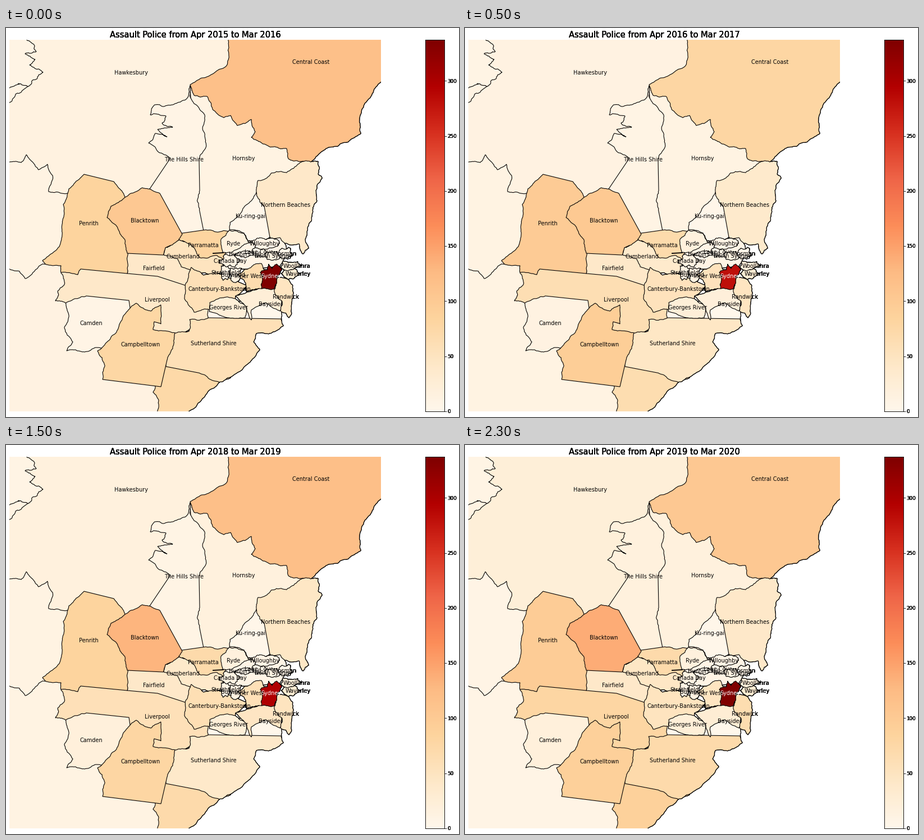
Animation, 807 px wide and 694 px high, one loop 2500 ms. Source, as a matplotlib script:

```python
import numpy as np
import matplotlib.pyplot as plt
from matplotlib.animation import FuncAnimation
from matplotlib.patches import Polygon

W, H = 807, 694
LEFT, TOP, RIGHT, BOTTOM = 6, 21, 668, 684
VMAX = 337.4
YEARS = 5
PX = 0.72  # points per pixel at 100 dpi
CMAP = plt.get_cmap("OrRd")

plt.rcParams["font.family"] = "DejaVu Sans"
fig = plt.figure(figsize=(W / 100, H / 100), dpi=100, facecolor="white")
rng = np.random.default_rng(7)
areas = []


def pixel_axes(x0, y0, x1, y1):
    return fig.add_axes([x0 / W, 1 - y1 / H, (x1 - x0) / W, (y1 - y0) / H])


ax = pixel_axes(LEFT, TOP, RIGHT, BOTTOM)
ax.set_xlim(LEFT, RIGHT)
ax.set_ylim(BOTTOM, TOP)
ax.axis("off")


def roughen(coords, wobble):
    """Break edges into a ragged line by midpoint shifts; long edges stay straight."""
    pts = np.array(coords, float).reshape(-1, 2)
    ragged = np.hypot(*(np.roll(pts, -1, axis=0) - pts).T) < 45
    for _ in range(4):
        step = np.roll(pts, -1, axis=0) - pts
        shift = rng.uniform(-wobble, wobble, len(pts)) * ragged
        normal = np.column_stack([-step[:, 1], step[:, 0]])
        mid = pts + step / 2 + shift[:, None] * normal
        pts = np.stack([pts, mid], axis=1).reshape(-1, 2)
        ragged = np.repeat(ragged, 2)
    return pts


def label(name, x, y, color="black"):
    # Copies below the map darken the letters that reach past the coast.
    for z in (0, 0, 0, 0, 5):
        ax.text(x, y + 3.6, name, color=color, size=9.8 * PX, ha="center", zorder=z)


def area(level, coords, wobble=0.1):
    """Add an area with one level, or one per year; later areas cover earlier ones."""
    pts = roughen(coords, wobble)
    ax.add_patch(Polygon(pts, fc="black", ec="black", lw=1.5 * PX, zorder=1))
    patch = Polygon(pts, ec="black", lw=1.1 * PX, zorder=2)
    ax.add_patch(patch)
    areas.append((patch, np.broadcast_to(level, YEARS)))


def suburb(name, x, y, level, rx, ry, dx=0):
    """A small harbour suburb: a spiky oval near its label."""
    label(name, x, y)
    a = np.linspace(0, 2 * np.pi, 16, endpoint=False)
    r = rng.uniform(0.65, 1.2, len(a))
    area(level, np.column_stack([x + dx + rx * r * np.cos(a), y + ry * r * np.sin(a)]), 0.2)


# Western and northern background
label("Hawkesbury", 223, 79)
area([15, 14, 18, 18, 25], [0, 10, 410, 10, 410, 110, 340, 320, 100, 320, 0, 320])
area([14, 13, 8, 13, 8], [0, 400, 0, 700, 300, 700, 300, 420])
area([13, 12, 12, 12, 8], [
    0, 239, 27, 240, 36, 226, 49, 241, 58, 253, 74, 243, 83, 263, 76, 292, 109, 295,
    150, 300, 150, 400, 120, 425, 65, 421, 53, 431, 34, 447, 24, 434, 0, 430])
area(12, [0, 136, 17, 118, 40, 104, 20, 100, 0, 106], 0.15)
area(10, [
    0, 10, 33, 10, 37, 21, 50, 30, 54, 42, 34, 46, 52, 56, 42, 66, 66, 79, 55, 91,
    40, 104, 22, 99, 0, 106], 0.18)

label("Hornsby", 423, 232)
area([12, 12, 8, 18, 18], [
    328, 103, 420, 100, 520, 200, 543, 239, 500, 300, 470, 340, 420, 370, 340, 375])
label("Central Coast", 543, 60)
area([118, 80, 120, 120, 105], [
    397, 10, 397, 50, 393, 67, 358, 87, 328, 101, 335, 120, 358, 122, 368, 145,
    388, 160, 400, 156, 412, 174, 437, 163, 444, 185, 437, 195, 458, 207, 484, 213,
    500, 215, 503, 233, 521, 238, 543, 239, 570, 215, 610, 203, 632, 188, 630, 160,
    637, 140, 652, 118, 668, 96, 690, 90, 690, 10])
label("The Hills Shire", 317.5, 234)
area([8, 10, 14, 10, 18], [
    328, 103, 323, 125, 297, 137, 265, 137, 257, 155, 285, 157, 278, 170, 297, 177,
    270, 181, 287, 194, 266, 188, 254, 205, 270, 220, 293, 232, 254, 290, 270, 350,
    320, 375, 354, 372, 345, 327, 345, 290, 344, 235, 355, 198, 354, 155, 335, 135], 0.13)

# South-west and south
label("Liverpool", 269, 484)
area([42, 64, 66, 58, 80], [
    98, 436, 104, 458, 92, 470, 88, 487, 107, 491, 230, 520, 290, 560, 340, 530,
    370, 512, 340, 460, 250, 420, 120, 425], 0.15)
label("Camden", 151.5, 526)
area([8, 14, 12, 20, 20], [
    107, 490, 143, 478, 219, 486, 230, 560, 190, 590, 170, 571, 140, 578, 108, 576,
    119, 560, 104, 534, 112, 515, 108, 500])
area([75, 66, 72, 72, 90], [
    270, 600, 400, 590, 400, 624, 380, 632, 350, 661, 318, 690, 318, 700, 262, 700,
    272, 664, 262, 650, 270, 625])
area(2, [360, 495, 480, 480, 491, 509, 490, 525, 360, 525])
label("Sutherland Shire", 369.5, 562.5)
area([60, 46, 50, 40, 72], [
    285, 604, 280, 560, 301, 544, 326, 541, 327, 520, 362, 517, 490, 519, 494, 531,
    480, 541, 446, 545, 441, 560, 452, 574, 430, 600, 395, 624, 380, 632, 342, 615])
label("Campbelltown", 240, 564)
area([78, 95, 82, 80, 92], [
    219, 502, 232, 491, 258, 505, 276, 494, 276, 528, 264, 524, 262, 538, 301, 544,
    297, 572, 287, 592, 276, 640, 172, 627, 176, 602, 163, 576, 195, 545, 204, 525])

# West
label("Penrith", 147.5, 348)
area([85, 100, 85, 85, 98], [
    139, 261, 192, 274, 212, 302, 230, 320, 230, 390, 219, 403, 216, 438, 133, 430,
    128, 440, 98, 436, 98, 424, 70, 421, 65, 415, 95, 390, 100, 350, 102, 315, 112, 287], 0.08)
label("Fairfield", 263.5, 428)
area(42, [219, 395, 285, 395, 345, 420, 345, 450, 319, 459, 270, 443, 216, 438])
label("Cumberland", 315, 407.5)
area([52, 38, 33, 40, 45], [
    281, 405, 284, 392, 308, 378, 345, 390, 390, 405, 383, 436, 345, 437, 312, 426, 306, 412])
label("Parramatta", 351, 387)
area([83, 70, 72, 72, 72], [
    300, 368, 356, 360, 398, 362, 415, 370, 400, 405, 391, 417, 376, 406, 346, 410,
    335, 392, 309, 378])
label("Blacktown", 247, 343)
area([105, 103, 120, 132, 141], [
    212, 302, 243, 285, 274, 295, 314, 368, 307, 379, 284, 392, 280, 405, 216, 402,
    212, 378, 196, 352, 180, 338, 187, 318], 0.08)

# Inner south
label("Canterbury-Bankstown", 380.5, 465)
area([60, 55, 45, 62, 52], [
    319, 459, 330, 427, 352, 441, 384, 440, 430, 460, 409, 478, 408, 490, 364, 495,
    364, 503, 335, 507, 318, 483])
label("Georges River", 396, 498)
area(25, [363, 490, 380, 482, 409, 483, 428, 495, 426, 517, 395, 517, 362, 506])
label("Bayside", 469, 492)
area([26, 22, 22, 48, 28], [
    409, 478, 430, 471, 450, 465, 485, 460, 491, 488, 488, 505, 463, 490, 437, 503,
    437, 521, 428, 497])

# North shore
label("Ku-ring-gai", 436, 335)
area(5, [
    446, 293, 425, 318, 399, 347, 398, 360, 424, 366, 433, 383, 470, 373, 485, 360, 470, 310])
label("Northern Beaches", 498.5, 315)
area([42, 38, 44, 46, 42], [
    543, 239, 556, 238, 556, 261, 563, 268, 552, 290, 546, 325, 541, 347, 533, 378,
    539, 393, 529, 403, 522, 385, 500, 384, 470, 373, 460, 318, 446, 292, 449, 272,
    482, 256, 500, 258, 523, 241], 0.14)
label("Ryde", 405, 384)
area(18, [398, 361, 424, 366, 434, 385, 425, 400, 386, 400, 383, 377])

# Harbour
area(8, [430, 384, 488, 374, 500, 395, 488, 425, 440, 430, 390, 430, 390, 402])
suburb("Strathfield", 390.5, 436, 8, 9, 14)
suburb("Burwood", 404, 440, 14, 12, 14, 6)
suburb("Canada Bay", 399.5, 415, 12, 18, 11)
suburb("Hunters Hill", 426, 403, 3, 18, 6)
suburb("Lane Cove", 450.5, 399, 6, 14, 10)
suburb("Willoughby", 461, 384, 8, 26, 10)
suburb("North Sydney", 476, 406, 12, 16, 8)
suburb("Mosman", 497, 402, 5, 13, 10)
label("Inner West", 433, 442)
area([68, 55, 60, 60, 50], [
    413, 440, 438, 425, 455, 420, 470, 450, 455, 465, 428, 470, 427, 455], 0.14)
label("Randwick", 498, 479)
area([50, 50, 50, 52, 66], [
    484, 445, 478, 467, 492, 488, 489, 504, 504, 517, 512, 480, 510, 458, 495, 446], 0.15)
suburb("Waverley", 520, 438, 30, 14, 9, -13)
suburb("Woollahra", 517.5, 424, 20, 17, 9, -11)
label("Sydney", 472.5, 442, "white")
area([337, 282, 290, 297, 337], [
    453, 436, 466, 431, 468, 421, 474, 429, 482, 421, 491, 430, 482, 444, 477, 466,
    455, 465, 457, 450], 0.14)

# Narrow river arm
ax.plot([369, 387], [402, 401], color="black", lw=1.8 * PX, zorder=3)

titles = [ax.text(337, 17, "", size=14.6 * PX, ha="center") for _ in range(4)]

bar = pixel_axes(747, TOP, 781, BOTTOM)
bar.imshow(np.linspace(0, 1, 256)[:, None], cmap=CMAP, origin="lower", aspect="auto",
           extent=(0, 34, 0, VMAX), interpolation="nearest")
bar.set_xticks([])
bar.set_yticks(range(0, 301, 50))
bar.yaxis.tick_right()
bar.tick_params(length=3.5 * PX, width=0.8 * PX, labelright=False)
for spine in bar.spines.values():
    spine.set_linewidth(0.9 * PX)
for v in range(0, 301, 50):
    for _ in range(4):
        bar.text(39, v - 3.2 * VMAX / (BOTTOM - TOP), str(v), size=8.8 * PX)


def update(i):
    for patch, levels in areas:
        patch.set_facecolor(CMAP(levels[i] / VMAX))
    for t in titles:
        t.set_text(f"Assault Police from Apr {2015 + i} to Mar {2016 + i}")
    return [patch for patch, _ in areas] + titles


anim = FuncAnimation(fig, update, frames=YEARS, interval=500, repeat=True, repeat_delay=0)
plt.show()
```
